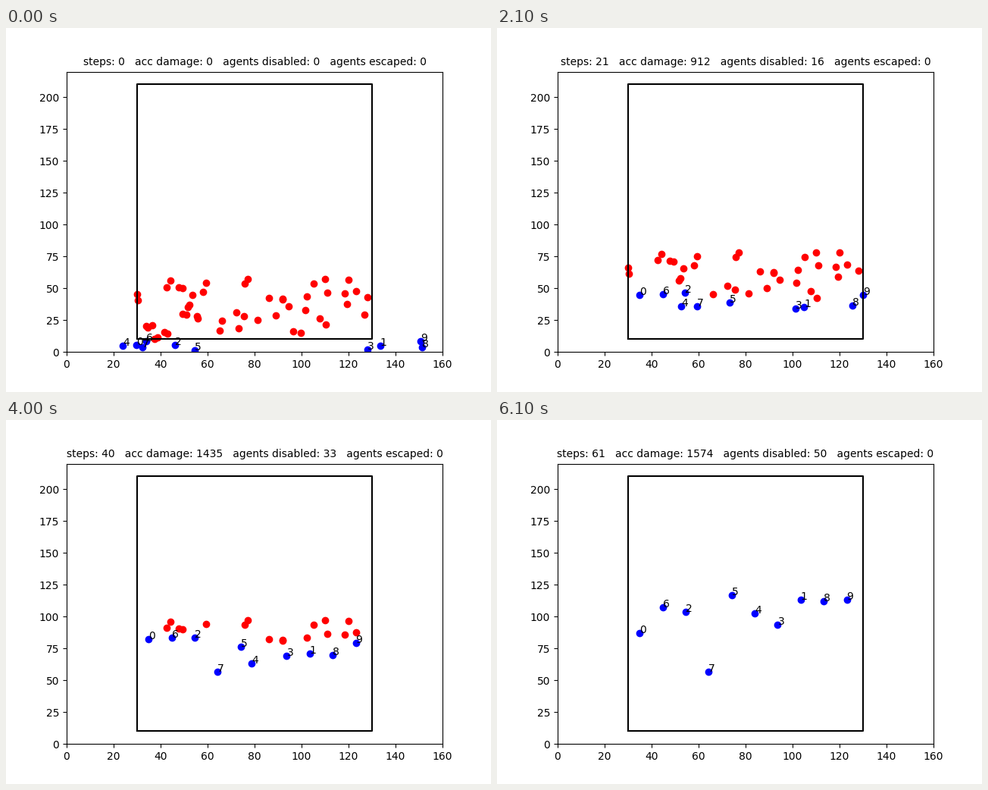
A matplotlib script for the animation above (6200 ms loop, 640 by 480 pixels).

```python
import numpy as np
import matplotlib.pyplot as plt
from matplotlib.animation import FuncAnimation

STEPS = np.arange(62)
SPEED = 2.0     # defenders; the red agents climb 1 per step
REACH = 7.0     # a red agent is disabled within this distance
LANES = 34.9 + 9.8 * np.arange(10)

# Starting points (x, y); everything after step 0 follows from them.
RED = np.array([
    (30.0, 45.3), (30.4, 40.3), (33.9, 20.3), (34.6, 19.2), (36.5, 20.9),
    (37.5, 10.3), (38.7, 11.3), (41.7, 15.6), (42.6, 51.0), (43.0, 14.3),
    (44.2, 56.0), (47.8, 50.7), (49.2, 50.1), (49.4, 29.8), (51.0, 29.3),
    (51.7, 35.2), (52.3, 37.0), (53.6, 44.8), (55.5, 28.1), (55.8, 26.1),
    (58.1, 47.1), (59.3, 54.2), (65.2, 16.8), (66.1, 24.5), (72.3, 31.0),
    (73.2, 18.5), (75.5, 28.1), (75.9, 53.7), (77.1, 57.0), (81.3, 25.1),
    (86.2, 42.2), (89.0, 28.9), (92.0, 41.8), (92.0, 41.1), (94.6, 35.8),
    (96.6, 16.3), (99.7, 15.0), (101.6, 33.1), (102.3, 43.5), (105.2, 53.4),
    (107.9, 26.6), (110.1, 57.1), (110.3, 21.3), (111.0, 46.7), (118.4, 46.0),
    (119.4, 37.9), (120.1, 56.8), (123.3, 47.7), (126.8, 29.2), (128.0, 42.9)])
BLUE = np.array([
    (29.7, 5.2), (133.5, 4.7), (46.1, 5.5), (128.1, 1.9), (23.9, 5.1),
    (54.5, 1.3), (33.9, 8.4), (32.3, 3.7), (151.3, 3.7), (150.6, 8.3)])
LANE_OF = [0, 7, 2, 6, 5, 4, 1, 3, 8, 9]


def defender_path(start, lane_x):
    """Cut off the lowest red agent of the lane, then chase the highest."""
    x0, y0 = start
    column = RED[np.abs(RED[:, 0] - lane_x) < 4.95, 1]
    low, high = column.min(), column.max()

    # Time t solves (SPEED t)^2 = dx^2 + (gap + t)^2 for SPEED = 2.
    dx, gap = lane_x - x0, low - y0
    t = (gap + np.sqrt(gap**2 + 3 * (dx**2 + gap**2))) / 3
    entry_y, entry_step = low + t, np.ceil(t)

    part = np.minimum(STEPS / t, 1)
    climb = SPEED * np.maximum(STEPS - entry_step, 0)
    meet_y = 2 * high - entry_y + SPEED * entry_step
    x = x0 + part * dx
    y = np.minimum(y0 + part * (entry_y - y0) + climb, meet_y - 1)
    return np.column_stack([x, y])


# Positions indexed [step, agent, axis].
blue = np.stack([defender_path(p, LANES[k]) for p, k in zip(BLUE, LANE_OF)],
                axis=1)
red = RED + STEPS[:, None, None] * np.array([0, 1])

dist = np.linalg.norm(blue[:, :, None] - red[:, None], axis=-1)
caught = (dist < REACH).any(axis=1)
caught[0] = False
alive = ~np.logical_or.accumulate(caught, axis=0)
active = alive.sum(axis=1)
damage = np.cumsum(active) - active

fig, ax = plt.subplots(figsize=(6.4, 4.8), dpi=100)
ax.set_xlim(0, 160)
ax.set_ylim(0, 220)
reds, = ax.plot([], [], "ro")
blues, = ax.plot([], [], "bo")
ax.plot([30, 130, 130, 30, 30], [10, 10, 210, 210, 10], "k-")
labels = [ax.text(0, 0, str(i)) for i in range(len(BLUE))]
title = ax.set_title("", fontsize=10)


def draw(step):
    reds.set_data(*red[step, alive[step]].T)
    blues.set_data(*blue[step].T)
    for label, spot in zip(labels, blue[step]):
        label.set_position(spot)
    title.set_text(f"steps: {step}   acc damage: {damage[step]}   "
                   f"agents disabled: {len(RED) - active[step]}   "
                   "agents escaped: 0")
    return [reds, blues, title, *labels]


anim = FuncAnimation(fig, draw, frames=len(STEPS), interval=100, repeat=True)
plt.show()
```
